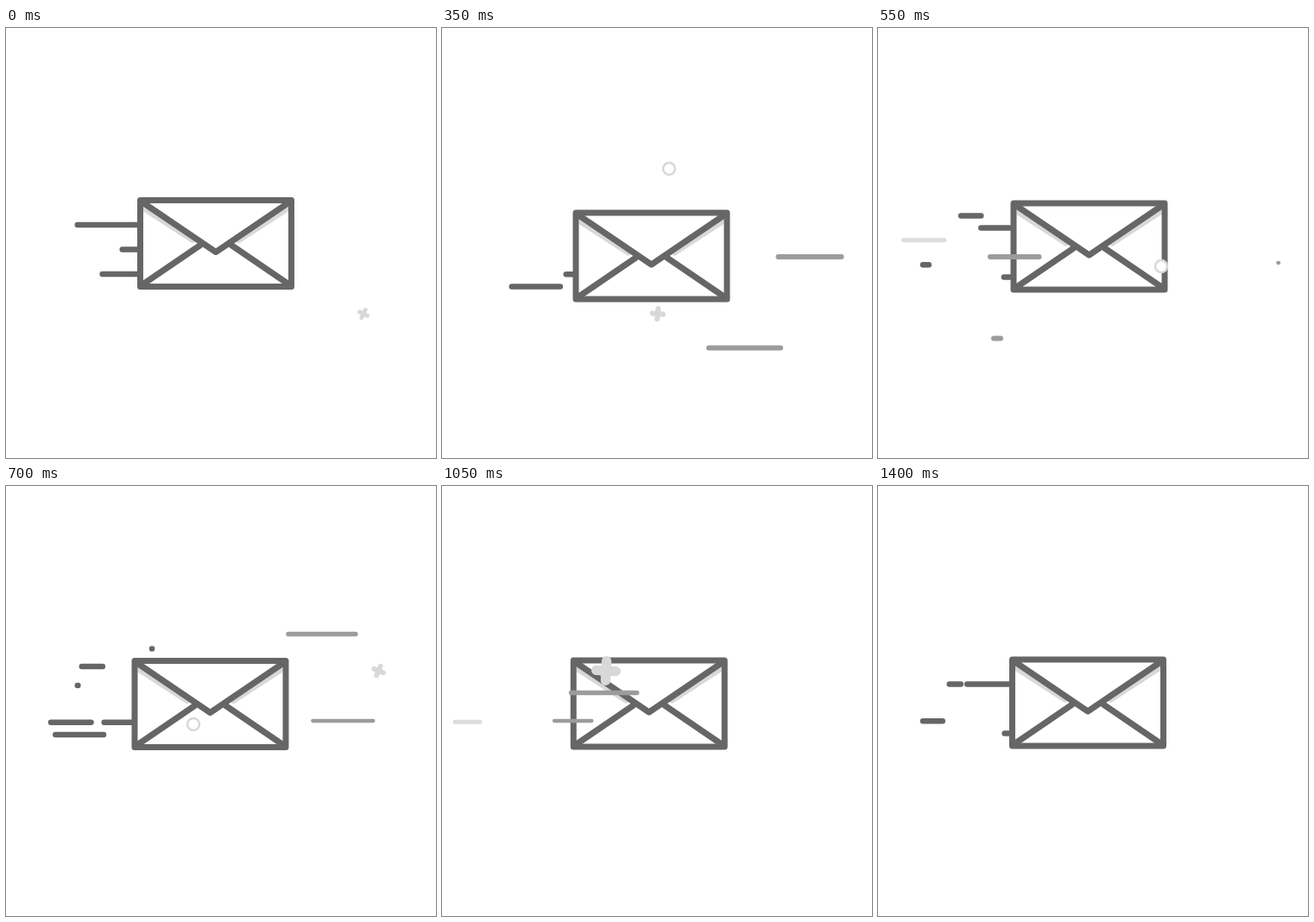
An HTML page with a canvas for the animation above (1.45 s loop, 498x498 px).

```html
<!DOCTYPE html>
<html>
<head>
<meta charset="utf-8">
<style>
html, body { margin: 0; overflow: hidden; background: #fff; }
canvas { display: block; }
</style>
</head>
<body>
<canvas id="stage" width="498" height="498"></canvas>
<script>
const ctx = document.getElementById('stage').getContext('2d');
const LOOP = 1450, STEP = 50;
const W = 175, H = 100, BACK = 155, FRONT = 464;
const DARK = '#666', GREY = '#9c9c9c', PALE = '#dcdcdc', SHADE = '#d8d8d8';
ctx.lineCap = ctx.lineJoin = 'round';

// Envelope poses: time, x, y
const poses = [
  [0, 155.5, 199.5], [350, 155, 214], [550, 157, 203], [700, 149, 202.5],
  [900, 151, 200], [1200, 153.5, 204], [1400, 155.5, 201], [LOOP, 155.5, 199.5]
];

// Trails: lane, launch time, length, [start x]
const trails = [
  [7, 244, 56], [6, 334, 55], [2, 466, 23], [3, 499, 69], [7, 537, 72], [6, 552, 47],
  [1.45, 604, 24], [6, 641, 84], [0, 700, 104, 169], [2, 807, 75], [4, 1070, 80],
  [6, 1251, 24], [3, 1281, 24], [3, 1326, 95], [7, 1388, 70], [5, 1421, 50]
];
const paleTrails = [[4, 371, 47], [4, 714, 46], [6, 820, 50], [11, 1070, 47]];

// Gusts: y, launch time, length, speed
const gusts = [
  [265, 296, 73, 1.38], [171.5, 577, 78, 1.115], [239.5, 788, 76, 1.2], [272, 549, 70, .72]
];

const laneY = lane => 14.2 * lane - 14;
const laneReach = lane => 70 + 18 * Math.cos((lane - 2) * Math.PI / 4);

function envelopeAt(t) {
  const i = poses.findIndex(p => p[0] > t);
  const [t0, x0, y0] = poses[i - 1], [t1, x1, y1] = poses[i];
  const e = (1 - Math.cos(Math.PI * (t - t0) / (t1 - t0))) / 2;
  return [x0 + (x1 - x0) * e, y0 + (y1 - y0) * e];
}

function trace(points) {
  ctx.beginPath();
  points.forEach(p => ctx.lineTo(...p));
}

function line(points, color, width) {
  trace(points);
  ctx.strokeStyle = color;
  ctx.lineWidth = width;
  ctx.stroke();
}

// Grows out of `start`, flies left and shrinks away at `reach`.
function streak(t, y, color, width, { launch, length, speed, start, reach }) {
  const nose = start - speed * ((t - launch + LOOP) % LOOP);
  const left = Math.max(reach, nose), right = Math.min(start, nose + length);
  if (right >= left) line([[left, y], [right + .1, y]], color, width);
}

function envelope(x, y) {
  ctx.save();
  ctx.translate(x + W / 2, y);
  ctx.fillStyle = '#fff';
  ctx.fillRect(-W / 2, 0, W, H);
  ctx.fillStyle = SHADE;
  for (const side of [1, -1]) {
    ctx.save();
    ctx.scale(side, 1);
    trace([[-84, 4], [-84, 13], [-27, 50], [-20, 46]]);
    ctx.fill();
    line([[-84, 97], [-18, 52]], DARK, 7);
    ctx.restore();
  }
  line([[-84, 3], [0, 60], [84, 3]], DARK, 7);
  ctx.strokeRect(-W / 2, 0, W, H);
  ctx.restore();
}

function ring(t, launch, x, y) {
  const age = t - launch;
  if (age < 0 || age > 400) return;
  ctx.beginPath();
  ctx.arc(x - .74 * age, y, 7, 0, 7);
  ctx.fillStyle = '#fff';
  ctx.fill();
  ctx.strokeStyle = SHADE;
  ctx.lineWidth = 2.5;
  ctx.stroke();
}

function sparkle(t, launch, x, y, speed, growth) {
  const age = t - launch, r = 5 + growth * age;
  if (age < 0 || age > 400) return;
  ctx.save();
  ctx.translate(x - speed * age, y);
  ctx.rotate(.45 - .001 * age);
  line([[-r, 0], [r, 0]], SHADE, r);
  line([[0, -r], [0, r]], SHADE, r);
  ctx.restore();
}

function draw(t) {
  const [x, y] = envelopeAt(t);
  ctx.clearRect(0, 0, 498, 498);
  for (const [lane, launch, length] of paleTrails)
    streak(t, y + laneY(lane), PALE, 5, { launch, length, speed: .7, start: BACK, reach: 15 });
  for (const [lane, launch, length, start = BACK] of trails)
    streak(t, y + laneY(lane), DARK, 6.5, { launch, length, speed: .7, start, reach: laneReach(lane) });
  streak(t, y + laneY(12), GREY, 6, { launch: 226, length: 83, speed: 1.25, start: FRONT, reach: 134 });
  envelope(x, y);
  for (const [gy, launch, length, speed] of gusts)
    streak(t, gy, GREY, 2.4 + 2.6 * speed, { launch, length, speed, start: FRONT, reach: 130 });
  ring(t, 100, 448, 163);
  ring(t, 400, 439, 276);
  sparkle(t, 0, 414, 331, .469, .003);
  sparkle(t, 650, 466, 214, .69, .016);
}

function tick() {
  draw(Math.floor(performance.now() % LOOP / STEP) * STEP);
  requestAnimationFrame(tick);
}
tick();
</script>
</body>
</html>
```
